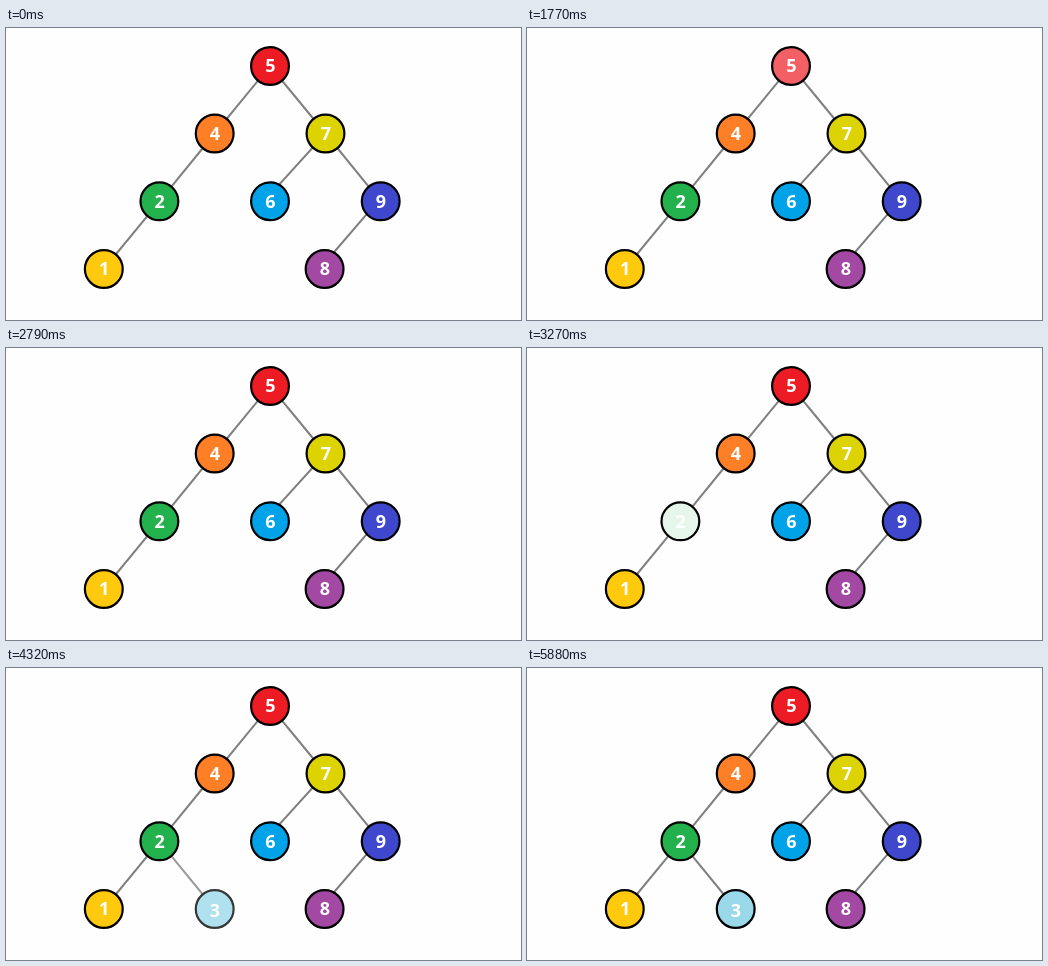
An HTML page for the animation above (5.97 s loop, 515 by 292 pixels).

```html
<!DOCTYPE html>
<html lang="en">
<head>
<meta charset="utf-8">
<title>Binary tree insertion</title>
<style>
  html, body { margin: 0; width: 100%; height: 100%; overflow: hidden; background: #fefefe; }
  svg { display: block; width: 100vw; height: 100vh; }
  line { stroke: #7f7f7f; stroke-width: 2; }
  circle { stroke: #000; stroke-width: 2.2; }
  text { font: 700 18px "Open Sans", "Noto Sans", sans-serif; fill: #fff; text-anchor: middle; }
</style>
</head>
<body>
<svg id="stage" viewBox="0 0 515 292"></svg>
<script>
const LOOP = 5970;
const PULSE = 460;
const PULSE_STARTS = { 5: 1380, 4: 1998, 2: 3015 };
const INSERT = { key: 3, start: 3930, length: 500 };

const nodes = {
  5: { x: 264, y: 38, color: [237, 28, 36] },
  4: { x: 208.7, y: 105.5, color: [255, 127, 39] },
  7: { x: 319.5, y: 105.5, color: [221, 211, 0] },
  2: { x: 153.4, y: 173.3, color: [34, 177, 76] },
  6: { x: 264, y: 173.3, color: [0, 162, 232] },
  9: { x: 374.7, y: 173.3, color: [63, 72, 204] },
  1: { x: 97.8, y: 241, color: [255, 201, 14] },
  3: { x: 208.7, y: 241, color: [153, 217, 234], drop: 1.5 },
  8: { x: 318.6, y: 241, color: [163, 73, 164] }
};

// parent, child, horizontal shift at each end
const edges = [
  [5, 4], [5, 7], [4, 2], [7, 6, 0, -6], [7, 9], [2, 1], [2, 3], [9, 8, -3, -5]
];

const stage = document.getElementById("stage");

function add(parent, tag, attrs) {
  const el = document.createElementNS("http://www.w3.org/2000/svg", tag);
  for (const name in attrs) el.setAttribute(name, attrs[name]);
  return parent.appendChild(el);
}

const rgb = color => `rgb(${color.map(Math.round).join(",")})`;
const clamp = v => Math.min(1, Math.max(0, v));

const branch = add(stage, "g", {});
for (const [from, to, shiftFrom = 0, shiftTo = 0] of edges) {
  const a = nodes[from], b = nodes[to];
  add(to === INSERT.key ? branch : stage, "line", {
    x1: a.x + shiftFrom, y1: a.y, x2: b.x + shiftTo, y2: b.y
  });
}

for (const key in nodes) {
  const n = nodes[key];
  const group = Number(key) === INSERT.key ? branch : stage;
  n.disc = add(group, "circle", { cx: n.x, cy: n.y, r: 18.9, fill: rgb(n.color) });
  add(group, "text", { x: n.x + 0.3, y: n.y + 6.4 + (n.drop || 0) }).textContent = key;
}

function render(t) {
  for (const key in PULSE_STARTS) {
    const phase = clamp((t - PULSE_STARTS[key]) / PULSE);
    const white = 1 - Math.abs(2 * phase - 1);
    const n = nodes[key];
    n.disc.setAttribute("fill", rgb(n.color.map(c => c + (255 - c) * white)));
  }
  branch.setAttribute("opacity", clamp((t - INSERT.start) / INSERT.length));
}

const begin = performance.now();
function tick() {
  render((performance.now() - begin) % LOOP);
  requestAnimationFrame(tick);
}
render(0);
requestAnimationFrame(tick);
</script>
</body>
</html>
```
